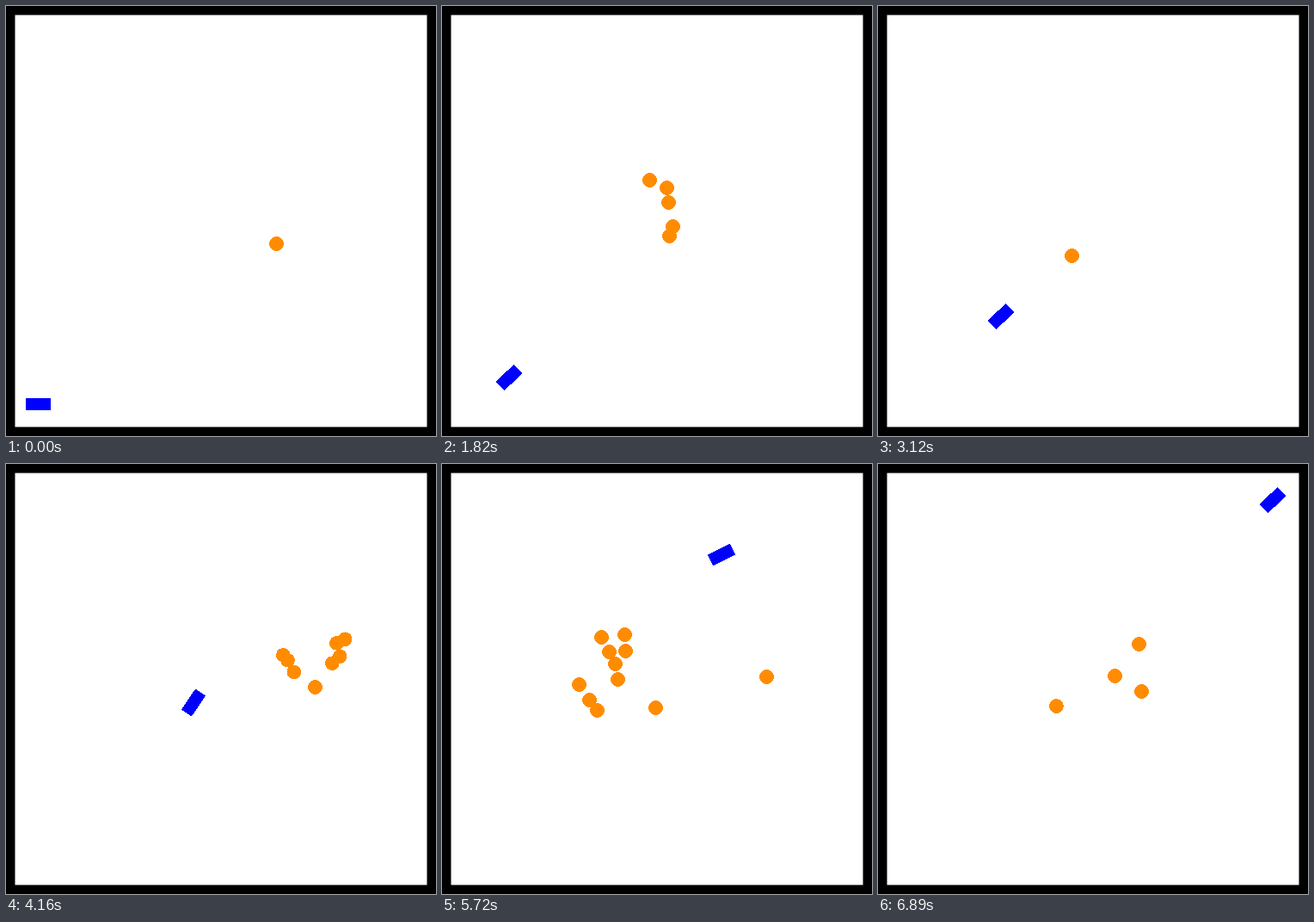
Animation, 500 px wide and 500 px high, one loop 7.02 s. Source, as a matplotlib script:

```python
import numpy as np
import matplotlib.pyplot as plt
from matplotlib.animation import FuncAnimation
from matplotlib.patches import Circle, Polygon, Rectangle

SIZE, FRAMES, STEP_MS = 500, 54, 130
# Unsmoothed fills cover every touched pixel, so shapes are half a pixel smaller per side.
CAR_LENGTH, CAR_WIDTH = 28, 13
DOT_RADIUS = 7.65
DOT_X_RANGE, DOT_Y_MAX = (135, 403), 300

# step, x, y, heading in degrees
CAR_KEYS = np.array([
    (0, 37.5, 463, 0), (6, 46.5, 458.5, 36), (14, 78, 432, 44),
    (24, 143, 361, 43.6), (32, 218, 277.5, 56), (37, 261, 202.5, 65),
    (44, 325, 105.5, 26.5), (48, 390, 86, 17), (53, 459, 42, 44),
])
CAR_TIMES, CAR_POSES = CAR_KEYS[:, 0], CAR_KEYS[:, 1:]
CAR_SLOPES = np.gradient(CAR_POSES, CAR_TIMES, axis=0)


def car_pose(step):
    """Cubic Hermite interpolation of position and heading."""
    i = min(np.searchsorted(CAR_TIMES, step, side="right") - 1, len(CAR_TIMES) - 2)
    span = CAR_TIMES[i + 1] - CAR_TIMES[i]
    u = (step - CAR_TIMES[i]) / span
    return ((1 + 2 * u) * (1 - u) ** 2 * CAR_POSES[i]
            + u * u * (3 - 2 * u) * CAR_POSES[i + 1]
            + u * (1 - u) ** 2 * span * CAR_SLOPES[i]
            + u * u * (u - 1) * span * CAR_SLOPES[i + 1])


def car_corners(step):
    x, y, heading = car_pose(step)
    t = np.radians(heading)
    ahead = np.array([np.cos(t), -np.sin(t)]) * CAR_LENGTH / 2
    side = np.array([np.sin(t), np.cos(t)]) * CAR_WIDTH / 2
    return np.array([x, y]) + [ahead + side, ahead - side, -ahead - side, side - ahead]


def dot(step, x, y, vx, vy):
    """Constant velocity path through (x, y) at the given step."""
    return lambda k: (x + vx * (k - step), y + vy * (k - step))


def wave(step, vx, *points):
    """Dots of one speed that slowly fan out from the middle line."""
    return [dot(step, x, y, vx, (y - 228) / 14) for x, y in points]


def swarm(step, span, *ends):
    """Dots given by where each one is at a step and a span later."""
    return [dot(step, x, y, (x2 - x) / span, (y2 - y) / span) for x, y, x2, y2 in ends]


paths = [
    dot(0, 314, 276, -17, 5),
    dot(24, 225, 290, -22.5, 5),
    dot(32, 359, 259, -17, 9),
    dot(44, 377, 247, -18.9, 3.78),
    *wave(14, -14.2, (241, 202), (261, 211), (263, 228), (268, 256), (264, 267)),
    *swarm(37, 7,
           (254, 236, 159, 256), (262, 247, 171, 274), (270, 260, 180, 286),
           (301, 205, 185, 201), (307, 221, 194, 218), (306, 239, 204, 250),
           (318, 201, 212, 198), (334, 216, 201, 232), (345, 204, 213, 217),
           (367, 246, 248, 283)),
    *wave(53, -19, (303, 209), (275, 246), (306, 264)),
]

fig = plt.figure(figsize=(5, 5), dpi=100, facecolor="black")
ax = fig.add_axes([0, 0, 1, 1])
ax.set_xlim(0, SIZE)
ax.set_ylim(SIZE, 0)
ax.axis("off")
ax.add_patch(Rectangle((10.5, 10.5), 479, 479, fc="white", lw=0, snap=False))

flat = dict(lw=0, aa=False, snap=False)
circles = [ax.add_patch(Circle((0, 0), DOT_RADIUS, fc="#ff8c00", **flat)) for _ in paths]
car = ax.add_patch(Polygon(car_corners(0), fc="#0000ff", **flat))


def draw(step):
    car.set_xy(car_corners(step))
    for circle, path in zip(circles, paths):
        x, y = path(step)
        circle.center = x + 0.5, y + 0.5
        circle.set_visible(DOT_X_RANGE[0] <= x <= DOT_X_RANGE[1] and y <= DOT_Y_MAX)
    return [car, *circles]


anim = FuncAnimation(fig, draw, frames=FRAMES, interval=STEP_MS, repeat=True, repeat_delay=0)
plt.show()
```
